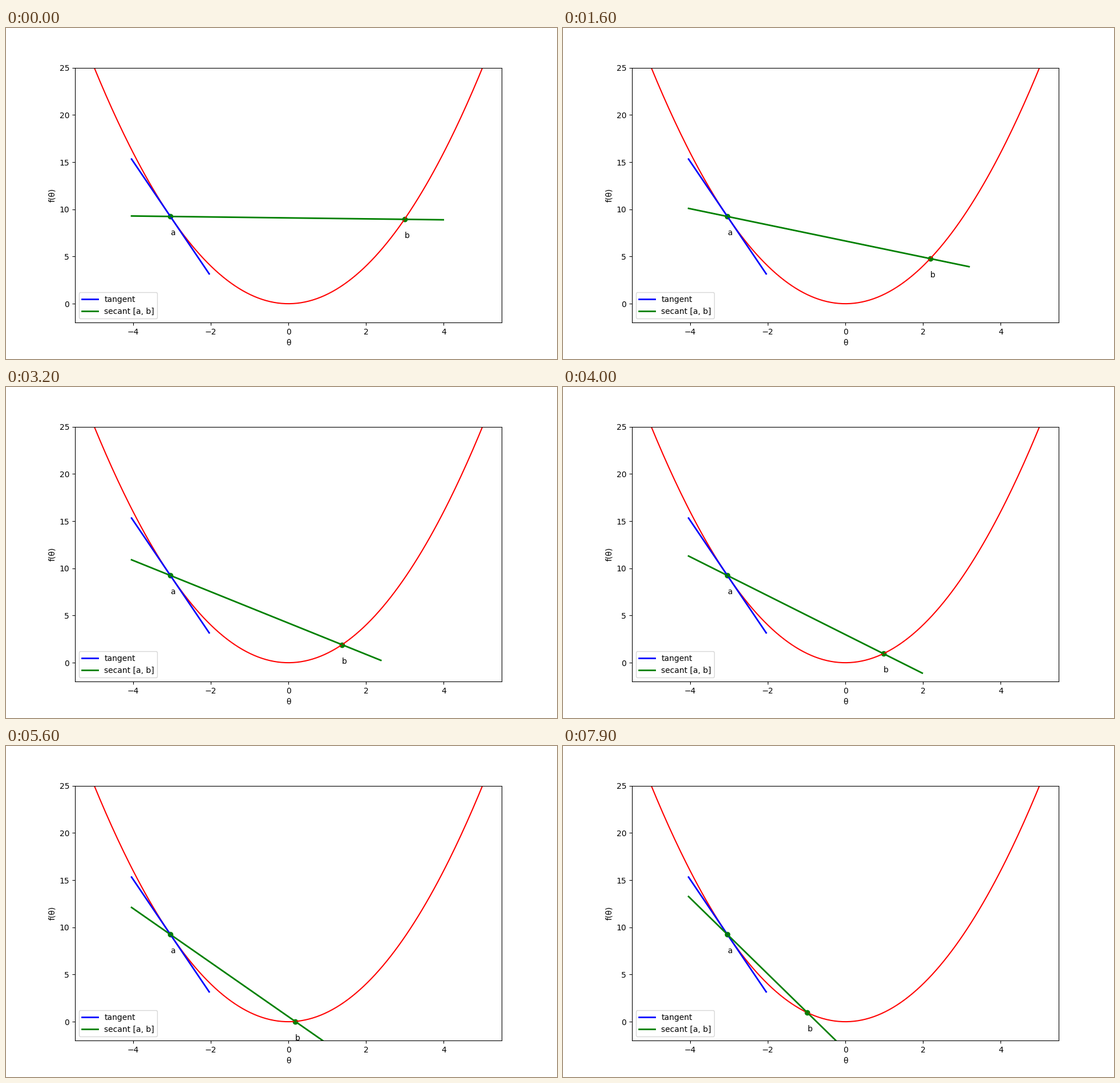
A matplotlib script for the animation above (8 s loop, 966 by 580 pixels).

```python
import numpy as np
import matplotlib.pyplot as plt
from matplotlib.animation import FuncAnimation

plt.rcParams["font.family"] = "DejaVu Sans"

FRAMES = 80
INTERVAL = 100  # ms
LABEL_DROP = 2

theta = np.linspace(-5, 5, 200)
a = theta[39]
B_START = 159


def f(t):
    return t ** 2


def line_through_a(slope, x):
    return f(a) + slope * (x - a)


fig, ax = plt.subplots(figsize=(9.66, 5.8), dpi=100)
ax.set(xlim=(-5.5, 5.5), ylim=(-2, 25), xlabel="θ", ylabel="f(θ)")

ax.plot(theta, f(theta), color="red")

ends = np.array([a - 1, a + 1])
ax.plot(ends, line_through_a(2 * a, ends), color="blue", lw=2, label="tangent")
secant, = ax.plot([], [], color="green", lw=2, label="secant [a, b]")

ax.scatter([a], [f(a)], color="green")
dot_b = ax.scatter([a], [f(a)], color="green")
ax.text(a, f(a) - LABEL_DROP, "a")
label_b = ax.text(0, 0, "b")
ax.legend(loc="lower left")


def update(i):
    b = theta[B_START - i]
    x = np.array([a - 1, b + 1])
    secant.set_data(x, line_through_a(a + b, x))  # chord slope of t² is a + b
    dot_b.set_offsets([[b, f(b)]])
    label_b.set_position((b, f(b) - LABEL_DROP))
    return secant, dot_b, label_b


anim = FuncAnimation(fig, update, frames=FRAMES, interval=INTERVAL,
                     repeat=True, repeat_delay=0)
plt.show()
```
